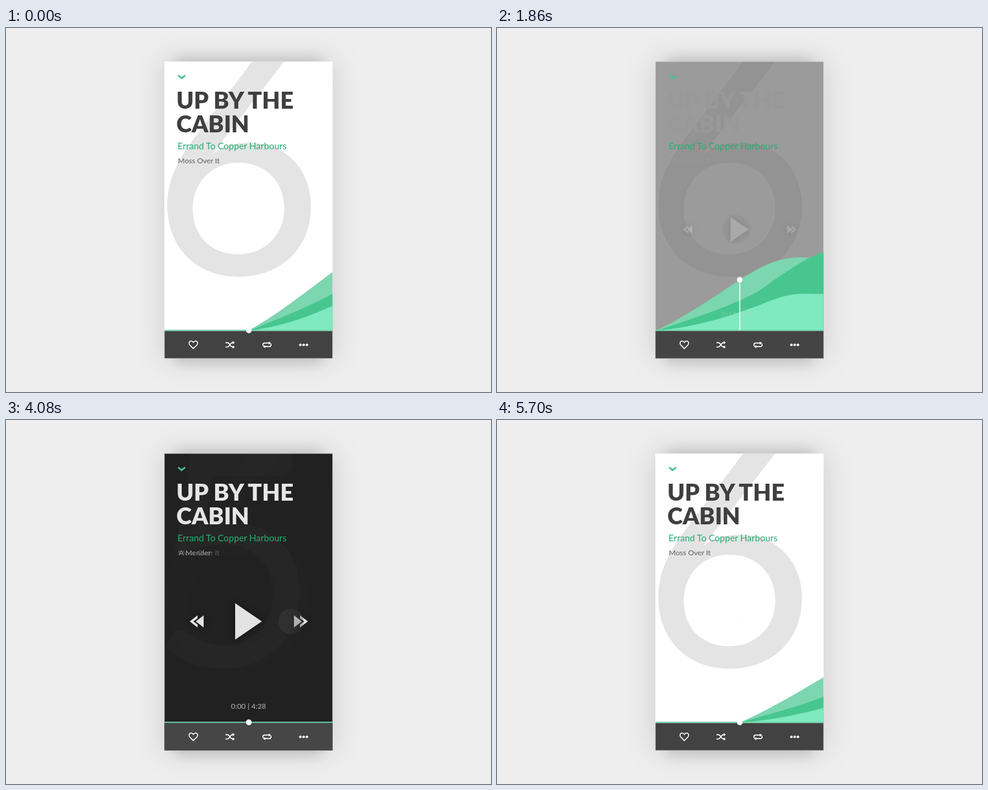
Write an HTML page that moves like this. It is 800 px wide and 600 px high and loops after 5730 ms.

```html
<!DOCTYPE html>
<html lang="en">
<head>
<meta charset="utf-8">
<title>Music player</title>
<style>
  html, body { margin: 0; width: 100%; height: 100%; overflow: hidden; background: #eee; }
  svg { display: block; width: 100%; height: 100%; font-family: Lato, sans-serif; }
  #glow { filter: blur(10px); }
  #shadow { filter: drop-shadow(0 0 24px rgba(0, 0, 0, .15)); }
  #controls { filter: drop-shadow(0 0 6px rgba(0, 0, 0, .4)); }
  #title { font-size: 38.5px; font-weight: 900; }
  #album { font-size: 15px; fill: #27ae74; }
  .small { font-size: 12.2px; }
  .time { text-anchor: middle; fill: #d4d4d4; }
  .line { fill: none; stroke: #fff; stroke-width: 1.6; }
</style>
</head>
<body>
<svg viewBox="0 0 800 600">
  <defs>
    <clipPath id="card"><rect x="261.5" y="55.5" width="277" height="489"/></clipPath>
    <path id="six" fill-rule="evenodd" d="M408 55H459L340 208C355 196 375 189 400 189C462 189 503 233 503 294C503 362 455 410 384 410C312 410 266 360 266 292C266 255 280 222 310 182L398 66Q403 57 408 55Z
      M383 222C339 222 308 255 308 298C308 342 337 373 383 373C428 373 459 340 459 298C459 253 428 222 383 222Z"/>
    <path id="skip" d="M326 322V342L313 332ZM316 322L303 332L316 342V337L309 332L316 327Z"/>
  </defs>

  <rect id="glow" x="280" y="50" width="240" height="502" opacity=".12"/>
  <rect id="shadow" x="261.5" y="55.5" width="277" height="489" fill="#fff"/>
  <g clip-path="url(#card)">
    <rect id="page" x="261" y="55" width="278" height="490"/>
    <use id="lightSix" href="#six" fill="#000"/>
    <g id="darkDigits" fill="#fff">
      <use id="darkSix" href="#six" x="-4.5"/>
      <path id="five" d="M305 55H473V68C473 85 465 93 448 93H341L328 172C345 169 360 168 372 168C445 170 484 220 484 283C484 360 430 410 357 410C318 410 288 398 264 374L276 352Q284 343 296 350C318 364 333 371 357 371C408 371 440 338 440 285C440 238 410 205 358 205C335 205 310 210 292 217Q282 220 278 218Z"/>
    </g>

    <path d="M284 78L289.7 82.7L295.5 78" fill="none" stroke="#43c296" stroke-width="2.8"/>
    <text id="title"><tspan x="281" y="133">UP BY THE</tspan><tspan x="281" y="172">CABIN</tspan></text>
    <text id="album" x="283" y="199.5">Errand To Copper Harbours</text>
    <text id="songSix" class="small" x="283.5" y="223">Moss Over It</text>
    <text id="songFive" class="small" x="285" y="223">A Mender</text>

    <path id="backWave" fill="#7cd6b0" d="M0 0C50-28 100-68 139-97S203-139 240-139S290-110 330-100V0Z"/>
    <path id="midWave" fill="#47c78f" d="M0 0C60-24 100-40 139-61S180-90 209-113S255-150 285-160S320-155 330-150V0Z"/>
    <path id="frontWave" fill="#7fe9c0" d="M0 0C60-8 100-24 139-41S185-65 209-74S245-80 277-80S310-75 330-70V0Z"/>

    <g id="controls" fill="#e3e3e3">
      <path id="play" d="M378 302L422 332L378 362Z"/>
      <use id="prev" href="#skip"/>
      <g id="next"><use href="#skip" transform="translate(801 0) scale(-1 1)"/></g>
    </g>
    <text id="timeSix" class="small time" x="400" y="476.3"></text>
    <text id="timeFive" class="small time" x="400" y="476.3">0:00 | 4:28</text>

    <rect x="261" y="497.4" width="278" height="2.2" fill="#74d9b1"/>
    <rect id="bar" x="261" y="499.5" width="278" height="46"/>
    <g class="line">
      <path d="M309 528.4L303.6 523.2C300.6 520 302 516 305.2 516C307 516 308.3 517 309 518.2C309.7 517 311 516 312.8 516C316 516 317.4 520 314.4 523.2Z"/>
      <path d="M362 518.6h3c4 0 4.5 7.2 8.5 7.2h1.5M362 525.8h3c4 0 4.5-7.2 8.5-7.2h1.5"/>
      <path d="M423.8 524v-2a2.6 2.6 0 0 1 2.6-2.6H434M437.2 520.5v2a2.6 2.6 0 0 1-2.6 2.6H427"/>
    </g>
    <path fill="#fff" d="M373.8 516L377.5 518.6L373.8 521.2ZM373.8 523.2L377.5 525.8L373.8 528.4ZM433.5 516.7L437.3 519.4L433.5 522.1ZM427.5 522.4L423.7 525.1L427.5 527.8Z"/>
    <g fill="#fff">
      <circle cx="485.6" cy="522.3" r="2.1"/><circle cx="491" cy="522.3" r="2.1"/><circle cx="496.4" cy="522.3" r="2.1"/>
    </g>

    <rect id="stem" x="399.7" width="1.6" fill="#fff"/>
    <circle id="knobShade" cx="400.5" r="5.6" opacity=".1"/>
    <circle id="knob" cx="400.5" r="4.8" fill="#fff"/>
    <circle id="tap" cy="332" fill="#444"/>
  </g>
</svg>
<script>
const LOOP = 5730;
const PAUSE = 1809;
const RESUME = 5165;
const TAPS = [[1450, 395], [2690, 306], [3710, 470], [4808, 392]];
// The nearer a wave lies, the sooner it sinks and the later it rises.
const WAVES = { backWave: 1.6, midWave: 2.2, frontWave: 3.2 };

const el = id => document.getElementById(id);
const set = (id, attrs) => {
  for (const name in attrs) el(id).setAttribute(name, attrs[name]);
};
const ramp = (t, from, to) => Math.min(1, Math.max(0, (t - from) / (to - from)));
const gray = (light, dark, p) => {
  const v = Math.round(light + (dark - light) * Math.min(1, p));
  return `rgb(${v},${v},${v})`;
};

function darkness(t) {
  if (t < PAUSE) return 0;
  if (t < RESUME) return 1 - 2 ** (-(t - PAUSE) / 60) - .018 * ramp(t, 4850, 5040);
  return .982 * 2 ** (-(t - RESUME) / 60);
}

function drawWaves(t) {
  const scroll = t < 4000 ? Math.min(t, 1870) * .0738 : 0;
  const level = t < RESUME ? 1 - ramp(t, PAUSE, PAUSE + 630) : ramp(t, RESUME, RESUME + 630);
  for (const id in WAVES) {
    set(id, { transform: `translate(${400 - scroll} 499) scale(1 ${level ** WAVES[id]})` });
  }
  const y = 498.4 - level ** WAVES.backWave * (.62 * scroll + .00055 * scroll * scroll);
  set('knob', { cy: y });
  set('knobShade', { cy: y + .4 });
  set('stem', { y, height: Math.max(0, 498 - y) });
}

function drawTap(t) {
  const active = TAPS.find(([start]) => t >= start && t < start + 420);
  if (!active) return set('tap', { opacity: 0 });
  const [start, cx] = active;
  const release = ramp(t, start + 300, start + 420);
  set('tap', { cx, r: 16 + 8 * release, opacity: .8 * ramp(t, start, start + 120) * (1 - release) });
}

function draw(t) {
  const dark = darkness(t);
  const shown = t < RESUME ? 1 - Math.exp(-Math.max(0, t - PAUSE) / 160) : dark;
  const five = ramp(t, 2960, 3270) - ramp(t, 3980, 4270);

  set('page', { fill: gray(255, 33, dark) });
  set('bar', { fill: gray(66, 70, dark) });
  set('title', { fill: gray(63, 230, dark * 1.2) });
  set('lightSix', { opacity: .106 * (1 - dark) });
  set('darkDigits', { opacity: .027 * dark });
  set('darkSix', { opacity: 1 - five });
  set('five', { opacity: five });

  const songFill = gray(95, 201, dark * 1.2);
  set('songSix', { fill: songFill, opacity: 1 - five });
  set('songFive', { fill: songFill, opacity: five });
  set('timeSix', { opacity: shown * (1 - five) });
  set('timeFive', { opacity: shown * five });
  el('timeSix').textContent = t < 3600 ? '0:15 | 4:37' : '0:00 | 4:37';

  const scale = .4 + .6 * dark;
  set('controls', { opacity: shown });
  for (const [id, x] of [['prev', 314.5], ['play', 400], ['next', 486.5]]) {
    set(id, { transform: `translate(${x} 332) scale(${scale}) translate(${-x} -332)` });
  }
  drawWaves(t);
  drawTap(t);
}

const begin = performance.now();
function frame() {
  draw((performance.now() - begin) % LOOP);
  requestAnimationFrame(frame);
}
frame();
</script>
</body>
</html>
```
